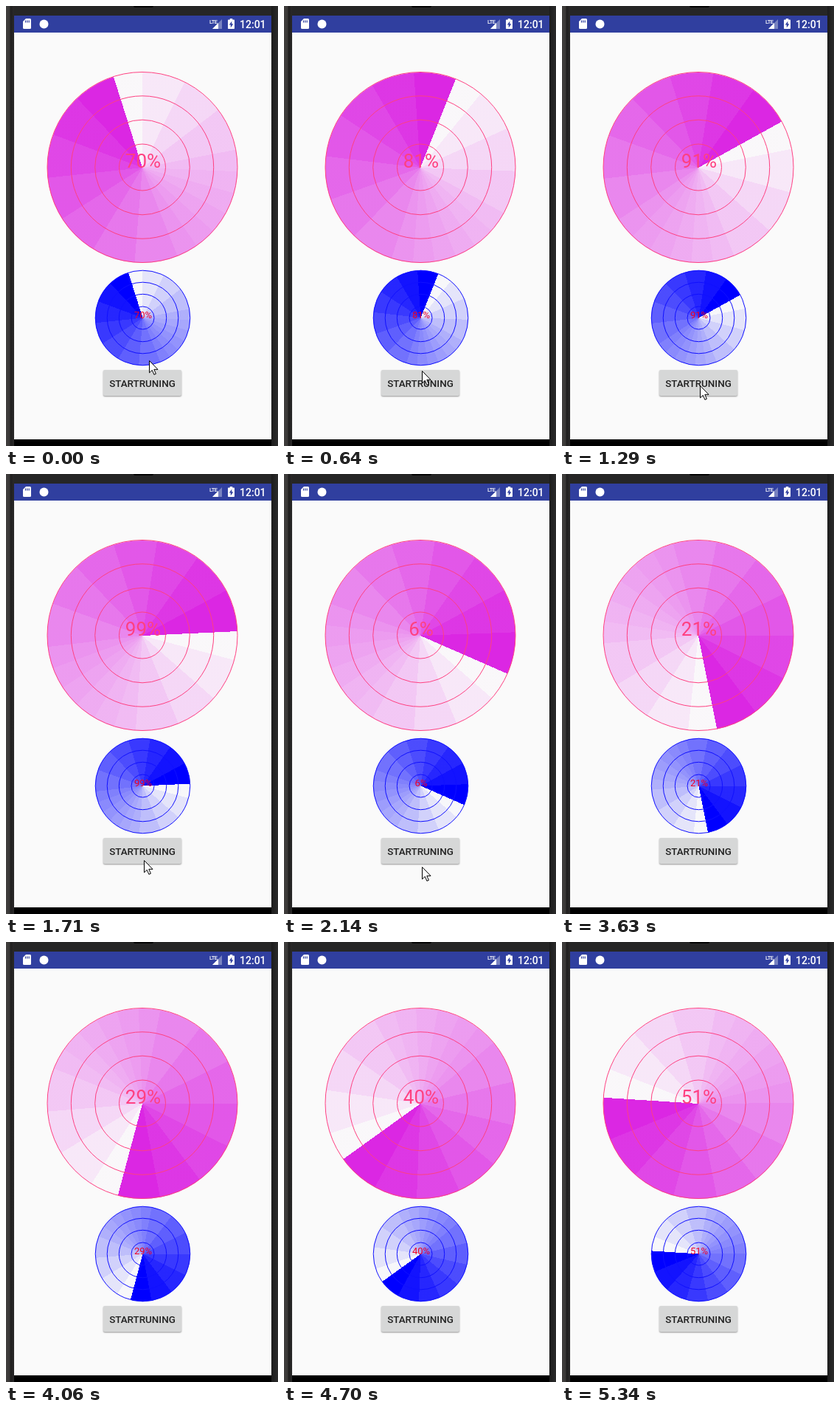
An HTML page that plays this animation: 369 px wide and 596 px high, repeating every 5440 ms.

```html
<!DOCTYPE html>
<html lang="en">
<head>
<meta charset="utf-8">
<title>Radar progress</title>
<style>
  html, body { margin: 0; width: 100%; height: 100%; overflow: hidden; background: #262626; }
  #stage { position: relative; width: 369px; height: 596px; overflow: hidden; }
  #stage > * { position: absolute; }
  .side { top: 0; height: 596px; }
  .left { left: 0; width: 11px; background: linear-gradient(90deg, #413f3e, #3a3837 5px, #1f1e1e 6px, #2a2929); }
  .right { left: 360px; width: 9px; background: linear-gradient(90deg, #1c1c1c, #2b2b2b); }
  .speaker { left: 173px; top: 0; width: 27px; height: 2px; background: #050505; border-radius: 0 0 3px 3px; }
  .status { left: 11px; top: 13px; width: 349px; height: 23px; background: #303f9f; }
  .page { left: 11px; top: 36px; width: 349px; height: 551px; background: #fafafa; }
  .base { left: 11px; top: 587px; width: 349px; height: 9px; background: #000; }
  .button { left: 132px; top: 493px; width: 106px; height: 35px; border-radius: 2px;
    background: #d6d7d7; box-shadow: 0 1px 2px rgba(0, 0, 0, .4); }
  .dial { border-radius: 50%; }
  #big { left: 56px; top: 89.5px; width: 258px; height: 258px; }
  #small { left: 121px; top: 358px; width: 129px; height: 129px; }
  svg { left: 0; top: 0; }
  text { font-family: Roboto, sans-serif; }
  .medium { font-weight: 500; }
</style>
</head>
<body>
<div id="stage">
  <div class="side left"></div>
  <div class="side right"></div>
  <div class="speaker"></div>
  <div class="status"></div>
  <div class="page"></div>
  <div class="base"></div>
  <div class="button"></div>
  <div class="dial" id="big"></div>
  <div class="dial" id="small"></div>
  <svg width="369" height="596" viewBox="0 0 369 596">
    <g fill="#fff">
      <path d="M27 17h5.5q1.5 0 1.5 1.500v11q0 1.500-1.500 1.500h-8q-1.500 0-1.500-1.500v-8.500z"/>
      <path d="M26.500 19.500v3M28.800 19.500v3M31.200 19.500v3" stroke="#303f9f" stroke-width="1.200"/>
      <circle cx="51.500" cy="24.500" r="6"/>
      <text class="medium" x="276" y="23.500" font-size="7.500" letter-spacing="-.6">LTE</text>
      <path d="M293 18v13h-13z" opacity=".35"/>
      <path d="M288 23v8h-8z"/>
      <path d="M303.800 17h3.400v1.500h2q.8 0 .8.800v11q0 .8-.8.800h-7.400q-.8 0-.8-.800v-11q0-.8.8-.800h2z"/>
      <path d="M306.300 20.500v3.700h2l-3.500 5.300v-3.900h-2z" fill="#303f9f"/>
      <text class="medium" x="317" y="29.700" font-size="14">12:01</text>
    </g>
    <g id="rings" fill="none"></g>
    <g text-anchor="middle">
      <text class="value" x="186" y="219" font-size="26" fill="#ff4081"></text>
      <text class="value" x="186" y="423" font-size="13" fill="#f00024"></text>
      <text class="medium" x="185" y="515.700" font-size="13.400" fill="#212121">STARTRUNING</text>
    </g>
    <path id="cursor" d="M.5.5v16.300l3.800-3.500 2.600 6 2.500-1.100-2.600-5.900h5.200z" fill="#fff" stroke="#000"/>
  </svg>
</div>
<script>
  // Hold of each step, in units of 10 ms
  const holds = [22, 21, 21, 22, 21, 22, 21, 21, 22, 21, 21, 22, 21,
                 22, 21, 21, 21, 22, 21, 22, 21, 21, 21, 22, 21, 10];
  const LOOP = 5440, TURN = 13.12, START = 252.4, RESTART = 11;
  // Pointer tip: step, x, y
  const path = [[0, 194, 480], [3, 187, 494], [5, 187, 514], [6, 187, 514],
                [10, 187, 532], [15, 187, 531], [16, 187, 572]];

  const $ = id => document.getElementById(id);
  const values = document.querySelectorAll('.value');
  const rings = $('rings'), cursor = $('cursor');

  // The sweep fades in as 14 flat bands; the middle ones are split in two
  function sweep(rgb) {
    const stops = [];
    for (let n = 0; n < 14; n++) {
      const parts = n > 3 && n < 7 ? 2 : 1;
      for (let p = 0; p < parts; p++) {
        const from = Math.max(0, 26.4 * (n + p / parts) - 8.9);
        const to = Math.min(360, 26.4 * (n + (p + 1) / parts) - 8.9);
        const shift = parts > 1 ? p / 2 - 0.25 : 0;
        stops.push(`rgba(${rgb},${(n + shift + 0.15) / 13.15}) ${from}deg ${to}deg`);
      }
    }
    return stops.join();
  }

  function addRings(x, y, radii, color) {
    for (const r of radii) {
      const ring = document.createElementNS('http://www.w3.org/2000/svg', 'circle');
      const attrs = { cx: x, cy: y, r, stroke: color };
      for (const key in attrs) ring.setAttribute(key, attrs[key]);
      rings.append(ring);
    }
  }

  const dials = [[$('big'), sweep('219,39,227')], [$('small'), sweep('0,0,255')]];
  addRings(185, 218.5, [129, 96.7, 64.3, 31.5], '#ff4081');
  addRings(185.5, 422.5, [64.3, 48.3, 32.2, 15.5], '#1010ff');

  function stepAt(time) {
    let k = 0, end = holds[0] * 10;
    while (time >= end && k < holds.length - 1) end += holds[++k] * 10;
    return k;
  }

  function placeCursor(k) {
    const i = path.findIndex(p => p[0] >= k);
    cursor.style.display = i < 0 ? 'none' : '';
    if (i < 0) return;
    const b = path[i], a = path[Math.max(0, i - 1)];
    const f = b === a ? 0 : (k - a[0]) / (b[0] - a[0]);
    const at = j => Math.round(a[j] + (b[j] - a[j]) * f);
    cursor.setAttribute('transform', `translate(${at(1)} ${at(2)})`);
  }

  // Pressing the button restarts the sweep from zero
  function draw(k) {
    const angle = k < RESTART ? (START + TURN * k) % 360 : TURN * (k - RESTART);
    for (const [dial, stops] of dials)
      dial.style.background = `conic-gradient(from ${angle + 90}deg, ${stops})`;
    for (const v of values) v.textContent = Math.floor(angle / 3.6) + '%';
    placeCursor(k);
  }

  const begin = performance.now();
  let last = -1;
  function tick() {
    const k = stepAt((performance.now() - begin) % LOOP);
    if (k !== last) draw(last = k);
    requestAnimationFrame(tick);
  }
  tick();
</script>
</body>
</html>
```
